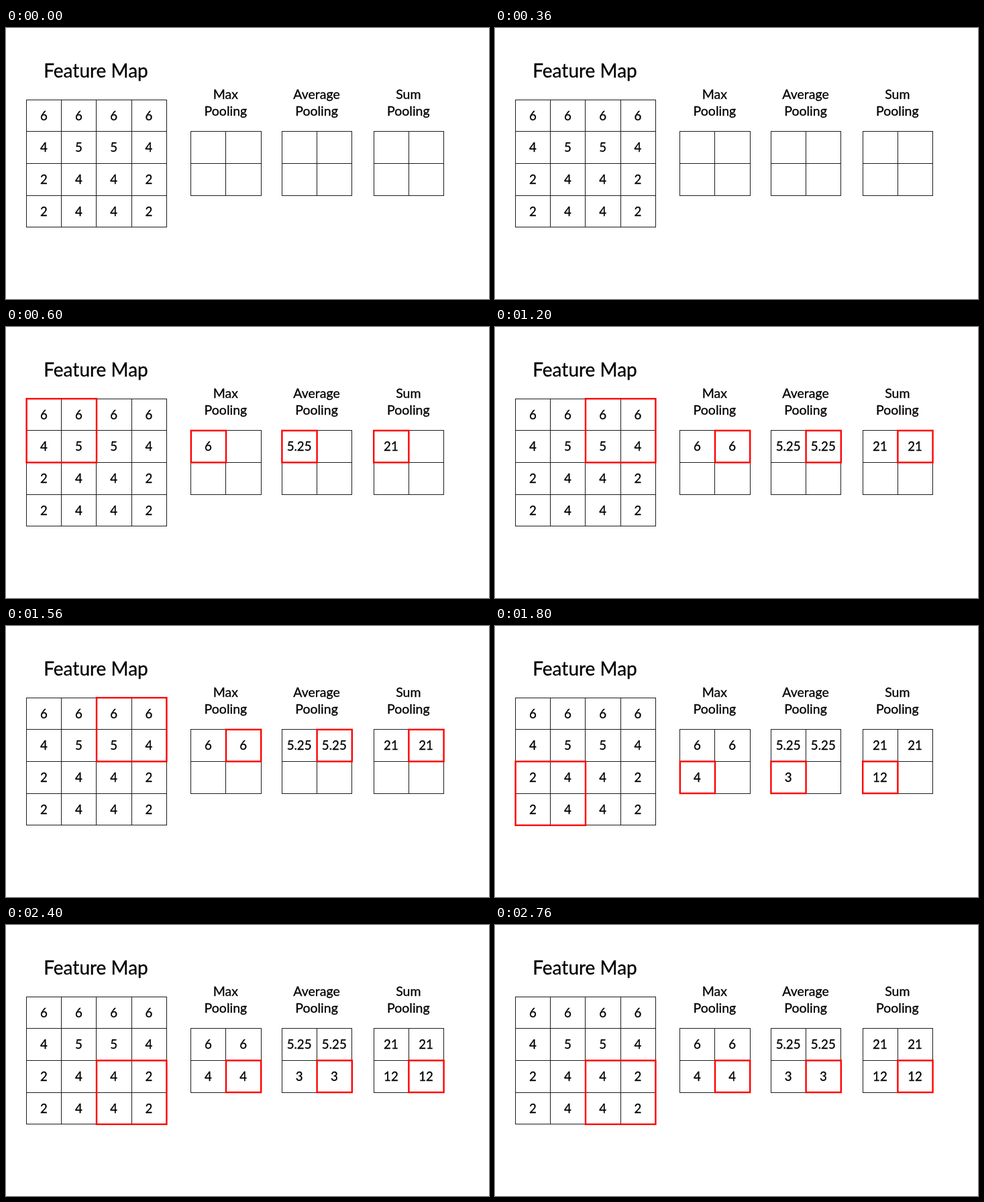
Write an HTML page that moves like this. It is 720 px wide and 405 px high and loops after 3 s.

```html
<!DOCTYPE html>
<html lang="en">
<head>
<meta charset="utf-8">
<title>Pooling</title>
<style>
  html, body { margin: 0; width: 100%; height: 100%; overflow: hidden; background: #fff; }
  svg { display: block; width: 720px; height: 405px; }
  text { font: 19.5px Lato, "Open Sans", sans-serif; text-anchor: middle; fill: #000; stroke: #000; stroke-width: 0.3; }
  .title { font-size: 28px; }
  .value { font-size: 18.7px; }
  .grid { fill: none; stroke: #1c1c1c; stroke-linecap: square; shape-rendering: crispEdges; }
  .mark { fill: none; stroke: #f00; stroke-width: 2.4; }
</style>
</head>
<body>
<svg id="stage" viewBox="0 0 720 405"></svg>
<script>
const STEP = 600, STEPS = 5;
const CELL_W = 52.2, CELL_H = 47.65;
const stage = document.getElementById('stage');

const features = ['6666', '4554', '2442', '2442'].map(row => [...row].map(Number));
const sum = v => v.reduce((a, b) => a + b, 0);
const map = { x: 30.4, y: 107.2 };
const pools = [
  { name: 'Max', x: 275.6, y: 154.8, op: v => Math.max(...v) },
  { name: 'Average', x: 411.2, y: 154.8, op: v => sum(v) / v.length },
  { name: 'Sum', x: 548, y: 154.8, op: sum }
];

function add(tag, attrs, parent = stage, label) {
  const el = document.createElementNS('http://www.w3.org/2000/svg', tag);
  for (const key in attrs) el.setAttribute(key, attrs[key]);
  if (label !== undefined) el.textContent = label;
  return parent.appendChild(el);
}

function grid({ x, y }, n) {
  const px = i => Math.floor(x + i * CELL_W) + 0.5;
  const py = i => Math.floor(y + i * CELL_H) + 0.5;
  let d = '';
  for (let i = 0; i <= n; i++) {
    d += `M${px(i)} ${py(0)}V${py(n)}M${px(0)} ${py(i)}H${px(n)}`;
  }
  add('path', { class: 'grid', d });
}

function cellText({ x, y }, col, row, value, parent) {
  const at = { class: 'value', x: x + (col + 0.5) * CELL_W - 0.2, y: y + (row + 0.5) * CELL_H + 6.8 };
  add('text', at, parent, value);
}

// outlines a block of size x size cells
function mark({ x, y }, col, row, size, parent) {
  add('rect', {
    class: 'mark',
    x: x + col * size * CELL_W + 0.2,
    y: y + row * size * CELL_H,
    width: size * CELL_W,
    height: size * CELL_H
  }, parent);
}

add('text', { class: 'title', x: 134, y: 74 }, stage, 'Feature Map');
grid(map, 4);
features.forEach((line, r) => line.forEach((v, c) => cellText(map, c, r, v)));

for (const p of pools) {
  [p.name, 'Pooling'].forEach((word, i) => add('text', { x: p.x + 51.8, y: 106 + 25 * i }, stage, word));
  grid(p, 2);
}

const quads = [0, 1, 2, 3].map(q => {
  const col = q % 2, row = q >> 1;
  const block = features.slice(row * 2, row * 2 + 2).flatMap(l => l.slice(col * 2, col * 2 + 2));
  const values = add('g', {}), marks = add('g', {});
  mark(map, col, row, 2, marks);
  for (const p of pools) {
    cellText(p, col, row, p.op(block), values);
    mark(p, col, row, 1, marks);
  }
  return { values, marks };
});

const show = (el, on) => el.setAttribute('visibility', on ? 'visible' : 'hidden');
const start = performance.now();

function draw(now) {
  const step = Math.floor(Math.max(0, now - start) / STEP) % STEPS;
  quads.forEach(({ values, marks }, q) => {
    show(values, q < step);
    show(marks, q === step - 1);
  });
  requestAnimationFrame(draw);
}
draw(start);
</script>
</body>
</html>
```
